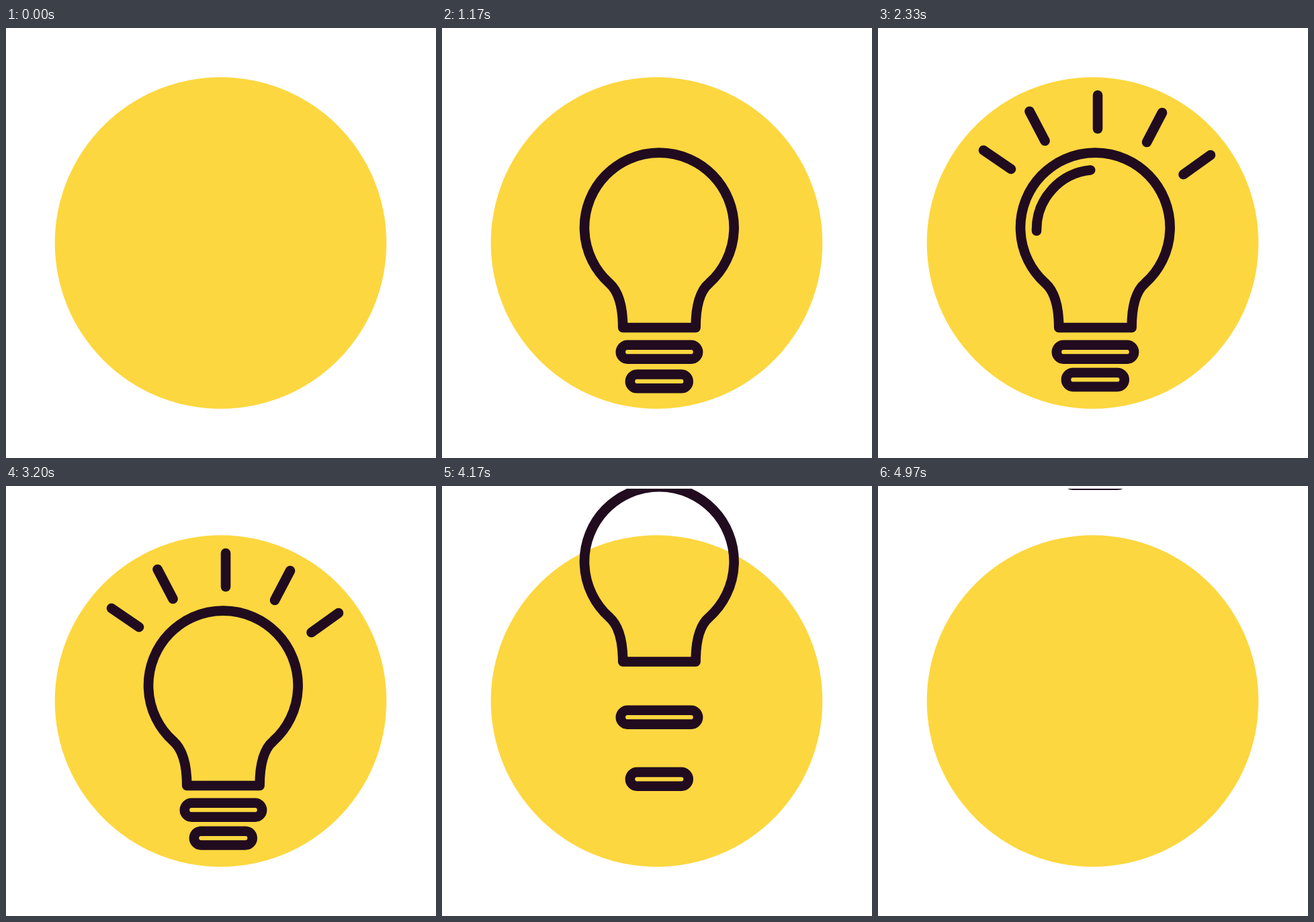
These frames come from a looping animation (640 by 640 pixels, 5030 ms). An HTML page:

```html
<!DOCTYPE html>
<html lang="en">
<head>
<meta charset="utf-8">
<title>Light bulb</title>
<style>
  html, body { margin: 0; width: 100%; height: 100%; overflow: hidden; background: #fff; }
  svg { display: block; width: 100%; height: 100%; }
  .ink { fill: none; stroke: #210b1f; stroke-width: 14.6; stroke-linecap: round; stroke-linejoin: round; }
</style>
</head>
<body>
<svg viewBox="0 0 640 640">
  <defs>
    <clipPath id="stage"><rect y="4" width="640" height="632"/></clipPath>
  </defs>
  <circle cx="319.5" cy="320" r="246.8" fill="#fdd73f"/>
  <g class="ink" clip-path="url(#stage)">
    <g id="rays"></g>
    <path id="shine" d="M236 302 V300 A89 89 0 0 1 414 300" pathLength="100"/>
    <path id="bulb" d="M269.2 446 C269.2 419 264 393 249 379.8 A111.3 111.3 0 1 1 397.6 379.8 C383 392 377.6 418 377.6 446 Z"/>
    <rect id="collar" x="265.8" y="471.8" width="115.3" height="20.8" rx="10.4"/>
    <rect id="cap" x="279.9" y="515.5" width="86.8" height="20.8" rx="10.4"/>
  </g>
</svg>
<script>
  const LOOP = 5030, LAST = 124;
  const $ = id => document.getElementById(id);
  const clamp = v => Math.max(0, Math.min(1, v));

  // arrive / leave are in ticks of 40 ms, rise / lift in px per tick
  const parts = [
    { el: $('bulb'), arrive: 25, rise: 27.75, leave: 96, lift: 23.06 },
    { el: $('collar'), arrive: 27, rise: 29, leave: 98, lift: 23 },
    { el: $('cap'), arrive: 29, rise: 28, leave: 100, lift: 22.4, drift: 2.45 }
  ];

  // line ends and the step per tick away from the resting place
  const rays = [
    { line: [157, 182, 198, 210], step: [-36, -23] },
    { line: [225.5, 124, 248.5, 168], step: [-16, -30] },
    { line: [327, 100, 327, 150], step: [0, -30] },
    { line: [423, 126, 400, 170], step: [16, -30] },
    { line: [495, 189, 454.5, 218], step: [30.25, -18.75] }
  ];
  for (const ray of rays) {
    const [x1, y1, x2, y2] = ray.line;
    ray.el = document.createElementNS('http://www.w3.org/2000/svg', 'path');
    ray.el.setAttribute('d', `M${x1} ${y1} L${x2} ${y2}`);
    $('rays').append(ray.el);
  }

  const move = (el, x, y) => el.setAttribute('transform', `translate(${x} ${y})`);

  function partY(p, k) {
    if (k < p.arrive) return (p.arrive - k) * p.rise;
    if (k > p.leave) return (p.leave - k) * p.lift;
    const u = ((k - p.arrive) / (p.leave - p.arrive)) ** 0.85;
    return -(p.drift || 0) * 4 * u * (1 - u);
  }

  function drawShine(k) {
    const head = 100 * clamp((k - 53) / 10.6);
    const tail = 100 * clamp((k - 60) / 13);
    const el = $('shine');
    el.style.display = head > tail ? '' : 'none';
    el.setAttribute('stroke-dasharray', `${head - tail} 300`);
    el.setAttribute('stroke-dashoffset', -tail);
  }

  // 25 ticks a second, shown on a 30 per second clock
  function tickAt(ms) {
    const shown = Math.floor((ms + 5) * 0.03);
    return Math.min(LAST, Math.floor((5 * shown + 2) / 6));
  }

  function draw(ms) {
    const k = tickAt(ms);
    for (const p of parts) move(p.el, 0, partY(p, k));
    rays.forEach((ray, i) => {
      const away = Math.max(0, 37 + 4 * i - k);
      move(ray.el, ray.step[0] * away, ray.step[1] * away);
      ray.el.style.opacity = 1 - clamp((k - 80 - 2 * i) / 5);
    });
    drawShine(k);
  }

  const start = performance.now();
  function loop() {
    draw((performance.now() - start) % LOOP);
    requestAnimationFrame(loop);
  }
  loop();
</script>
</body>
</html>
```
